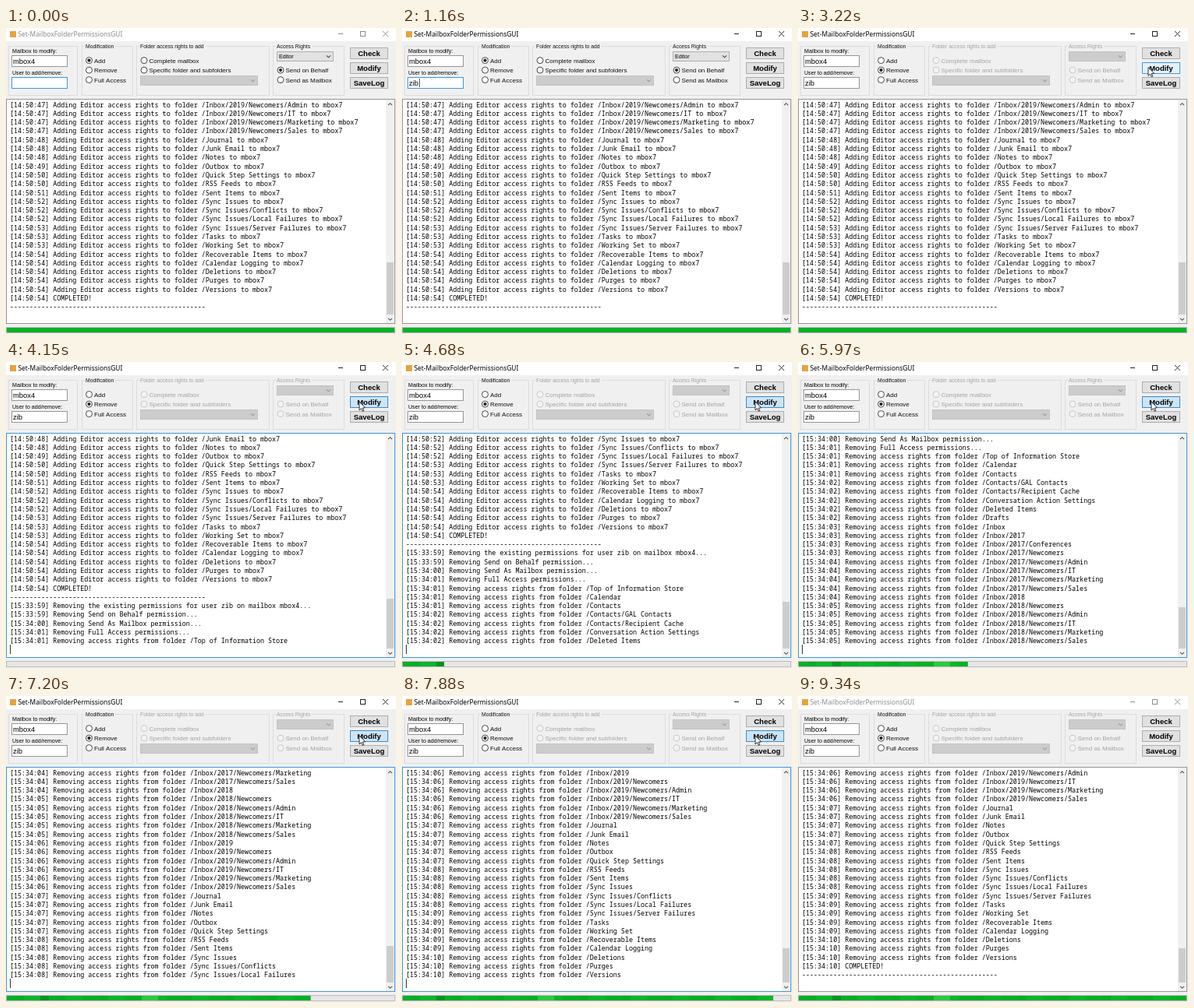
An HTML page with a canvas that plays this animation: 500 px wide and 393 px high, repeating every 9.49 s.

```html
<!DOCTYPE html>
<html lang="en">
<head>
<meta charset="utf-8">
<title>Set-MailboxFolderPermissionsGUI</title>
<style>
  html, body { margin: 0; width: 100%; height: 100%; overflow: hidden; background: #f0f0f0; }
  canvas { display: block; width: 500px; height: 393px; }
</style>
</head>
<body>
<canvas id="stage" width="500" height="393"></canvas>
<script>
const LOOP = 9490;
const ctx = document.getElementById('stage').getContext('2d');
const SANS = '"Liberation Sans", Arial, sans-serif';
const TITLE = '8.4px "Noto Sans", "Open Sans", sans-serif';
const MONO = '8.37px "Noto Sans Mono", "DejaVu Sans Mono", monospace';
const SMALL = '6.8px ' + SANS, LABEL = '7.1px ' + SANS, RADIO = '8px ' + SANS;
const FIELD = '9.4px ' + SANS, BOLD = 'bold 9.5px ' + SANS;

const OWNER = 'mbox4', GUEST = 'mbox7', TYPED = 'zib';
const LINE = 11.29, ROWS = 24, PAST = 75;
const BLUE = '#3f97de', EDGE = '#969696';

// Moments of the session, in ms
const ACTIVATE = 770, KEYS = [850, 1000, 1080], PICK = 2000;
const HOVER = 3060, PRESS = 3380, RELEASE = 8380, LEAVE = 9340;

// Number of log lines written over time
const WRITTEN = [
  [3400, 0], [3450, 1], [3600, 2], [3850, 3], [3980, 4], [4680, 11.05],
  [5970, 26.2], [7200, 42.2], [7870, 50.1], [8350, 52.2]
];
const POINTER = [
  [1400, 45, 70], [1900, 108, 54], [2380, 108, 54],
  [3100, 446, 50], [3380, 453, 51], [8400, 453, 51], [8880, 501, 122]
];

function track(points, t, k = 1) {
  if (t <= points[0][0]) return points[0][k];
  for (let i = 1; i < points.length; i++) {
    const a = points[i - 1], b = points[i];
    if (t < b[0]) return a[k] + (b[k] - a[k]) * (t - a[0]) / (b[0] - a[0]);
  }
  return points[points.length - 1][k];
}

function buildFolders() {
  const list = ['Top of Information Store', 'Calendar', 'Contacts', 'Contacts/GAL Contacts',
    'Contacts/Recipient Cache', 'Conversation Action Settings', 'Deleted Items', 'Drafts', 'Inbox'];
  for (const year of [2017, 2018, 2019]) {
    const base = 'Inbox/' + year;
    list.push(base);
    if (year === 2017) list.push(base + '/Conferences');
    list.push(base + '/Newcomers');
    for (const team of ['Admin', 'IT', 'Marketing', 'Sales']) list.push(base + '/Newcomers/' + team);
  }
  return list.concat(['Journal', 'Junk Email', 'Notes', 'Outbox', 'Quick Step Settings', 'RSS Feeds',
    'Sent Items', 'Sync Issues', 'Sync Issues/Conflicts', 'Sync Issues/Local Failures',
    'Sync Issues/Server Failures', 'Tasks', 'Working Set', 'Recoverable Items', 'Calendar Logging',
    'Deletions', 'Purges', 'Versions']);
}

// Each entry of counts says how many lines share one second
function stamp(lines, counts, start) {
  const out = [];
  counts.forEach((count, i) => {
    for (let k = 0; k < count; k++) {
      const s = start + i;
      const time = [s / 3600, s / 60 % 60, s % 60].map(v => String(Math.floor(v)).padStart(2, '0'));
      out.push('[' + time.join(':') + '] ' + lines[out.length]);
    }
  });
  return out.concat('-'.repeat(50));
}

const folders = buildFolders();
const added = folders.slice(-22).map(f => `Adding Editor access rights to folder /${f} to ${GUEST}`);
const removed = [
  `Removing the existing permissions for user ${TYPED} on mailbox ${OWNER}...`,
  'Removing Send on Behalf permission...',
  'Removing Send As Mailbox permission...',
  'Removing Full Access permissions...',
  ...folders.map(f => 'Removing access rights from folder /' + f)
];
const log = [
  ...stamp([...added, 'COMPLETED!'], [4, 3, 1, 2, 1, 3, 3, 6], 53447),
  ...stamp([...removed, 'COMPLETED!'], [2, 1, 4, 5, 4, 5, 5, 6, 5, 5, 5, 4], 56039)
];

function rect(x, y, w, h, color) {
  ctx.fillStyle = color;
  ctx.fillRect(x, y, w, h);
}

function frame(x, y, w, h, fill, border) {
  rect(x, y, w, h, border);
  rect(x + 1, y + 1, w - 2, h - 2, fill);
}

function text(str, x, y, font, color = '#000', align = 'left') {
  ctx.font = font;
  ctx.fillStyle = color;
  ctx.textAlign = align;
  ctx.fillText(str, x, y);
}

function stroke(color, width, ...points) {
  ctx.strokeStyle = color;
  ctx.lineWidth = width;
  ctx.beginPath();
  points.forEach(([x, y]) => ctx.lineTo(x, y));
  ctx.stroke();
}

function chevron(x, y, dir, color) {
  stroke(color, 1.1, [x - 2.5, y - dir * 1.2], [x, y + dir * 1.3], [x + 2.5, y - dir * 1.2]);
}

function group(x, w, title, off) {
  frame(x, 23, w, 64, '#f0f0f0', '#dcdcdc');
  if (!title) return;
  ctx.font = SMALL;
  rect(x + 4, 22, ctx.measureText(title).width + 3, 3, '#f0f0f0');
  text(title, x + 5, 26, SMALL, off ? '#a3a3a3' : '#111');
}

function radio(x, y, label, on, off) {
  ctx.beginPath();
  ctx.arc(x, y, 4, 0, 7);
  ctx.fillStyle = off ? '#f3f3f3' : '#fff';
  ctx.fill();
  ctx.strokeStyle = off ? '#c4c4c4' : '#333';
  ctx.lineWidth = 0.9;
  ctx.stroke();
  if (on) {
    ctx.beginPath();
    ctx.arc(x, y, 2.1, 0, 7);
    ctx.fillStyle = off ? '#c4c4c4' : '#222';
    ctx.fill();
  }
  text(label, x + 6.5, y + 3, RADIO, off ? '#a3a3a3' : '#111');
}

function combo(x, y, w, label, off) {
  frame(x, y, w, 13, off ? '#cccccc' : '#e1e1e1', off ? '#c3c3c3' : '#adadad');
  chevron(x + w - 6.5, y + 6.5, 1, off ? '#9a9a9a' : '#444');
  text(label, x + 3, y + 8.5, LABEL);
}

function button(y, label, fill = '#e1e1e1', border = '#adadad') {
  frame(441, y, 49, 15, fill, border);
  text(label, 465.5, y + 10.8, BOLD, '#000', 'center');
}

function titleBar(active) {
  const ink = active ? '#222' : '#8c8c8c';
  rect(0, 0, 500, 17, '#fff');
  rect(5, 4, 8, 8, '#e8a33d');
  text('Set-MailboxFolderPermissionsGUI', 15.5, 11, TITLE, active ? '#000' : ink);
  rect(426, 7, 6, 1, ink);
  frame(454, 4, 7, 7, '#fff', ink);
  stroke(ink, 0.9, [483, 4], [490, 11]);
  stroke(ink, 0.9, [490, 4], [483, 11]);
}

function form(t) {
  const off = t >= PICK;
  group(3, 89);
  text('Mailbox to modify:', 8, 32, LABEL);
  frame(7, 35, 72, 15, '#fff', EDGE);
  text(OWNER, 9, 46, FIELD);
  text('User to add/remove:', 8, 60, LABEL);
  frame(7, 63, 72, 15, '#fff', off ? EDGE : BLUE);
  const typed = TYPED.slice(0, KEYS.filter(k => t >= k).length);
  text(typed, 9, 74, FIELD);
  if (t >= ACTIVATE && !off) rect(Math.round(10 + ctx.measureText(typed).width), 65, 1, 11, '#555');

  group(97, 66, 'Modification');
  radio(106.5, 41.6, 'Add', !off);
  radio(106.5, 54.1, 'Remove', off);
  radio(106.5, 66.6, 'Full Access');

  group(167, 171, 'Folder access rights to add', off);
  radio(177, 41.6, 'Complete mailbox', false, off);
  radio(177, 54.1, 'Specific folder and subfolders', false, off);
  combo(172, 61, 151, '', true);

  group(342, 92, 'Access Rights', off);
  combo(347, 30, 73, off ? '' : 'Editor', off);
  radio(352, 54.1, 'Send on Behalf', !off, off);
  radio(352, 66.6, 'Send as Mailbox', false, off);

  button(25, 'Check');
  if (t >= PRESS && t < RELEASE) button(44, 'Modify', '#cce4f7', '#3d8bc8');
  else if (t >= HOVER && t < PRESS) button(44, 'Modify', '#e5f1fb', BLUE);
  else button(44, 'Modify');
  button(63, 'SaveLog');
}

function output(t, count) {
  const focused = t >= PRESS && t < LEAVE;
  frame(0, 91, 499, 289, '#fff', focused ? BLUE : EDGE);
  for (let i = 0; i < ROWS; i++) text(log[count + i], 5, 101.6 + i * LINE, MONO);
  if (focused) rect(5, 363, 1, 12, '#333');

  rect(487, 92, 11, 287, '#f0f0f0');
  chevron(492.5, 98, -1, '#505050');
  chevron(492.5, 374, 1, '#505050');
  const h = Math.round(265 * 25 / (PAST + ROWS + count));
  rect(488, 368 - h, 9, h, '#cdcdcd');
}

function progress(t, n) {
  const cell = 497 / 46;
  frame(0, 384, 499, 8, '#e6e6e6', '#bcbcbc');
  if (t < PRESS) return rect(1, 385, 497, 6, '#06b025');
  const width = Math.max(0, Math.min(497, (n - 6.15) * cell));
  for (let i = 0; i * cell < width; i++) {
    let color = ['#06b025', '#0cb62b', '#09ab27'][i * 7 % 5 % 3];
    if (i === 4) color = '#079322';
    if (i === 16 || i === 17) color = '#2cc93f';
    const x = Math.round(i * cell);
    rect(1 + x, 385, Math.min(Math.round((i + 1) * cell), width) - x, 6, color);
  }
}

function pointer(t) {
  if (t < POINTER[0][0] || t > 8880) return;
  ctx.save();
  ctx.translate(track(POINTER, t, 1), track(POINTER, t, 2));
  ctx.beginPath();
  [[0, 0], [0, 11], [2.5, 8.7], [4.2, 12.3], [5.8, 11.6], [4.2, 8], [7.6, 7.8]]
    .forEach(([x, y]) => ctx.lineTo(x, y));
  ctx.closePath();
  ctx.fillStyle = '#fff';
  ctx.fill();
  ctx.strokeStyle = '#000';
  ctx.lineWidth = 0.8;
  ctx.stroke();
  ctx.restore();
}

function draw(now) {
  const t = now % LOOP;
  const n = track(WRITTEN, t);
  rect(0, 0, 500, 393, '#f0f0f0');
  titleBar(t >= ACTIVATE && t < LEAVE);
  form(t);
  output(t, Math.floor(n));
  progress(t, n);
  pointer(t);
}

const start = performance.now();
function tick() {
  draw(performance.now() - start);
  requestAnimationFrame(tick);
}
tick();
</script>
</body>
</html>
```
